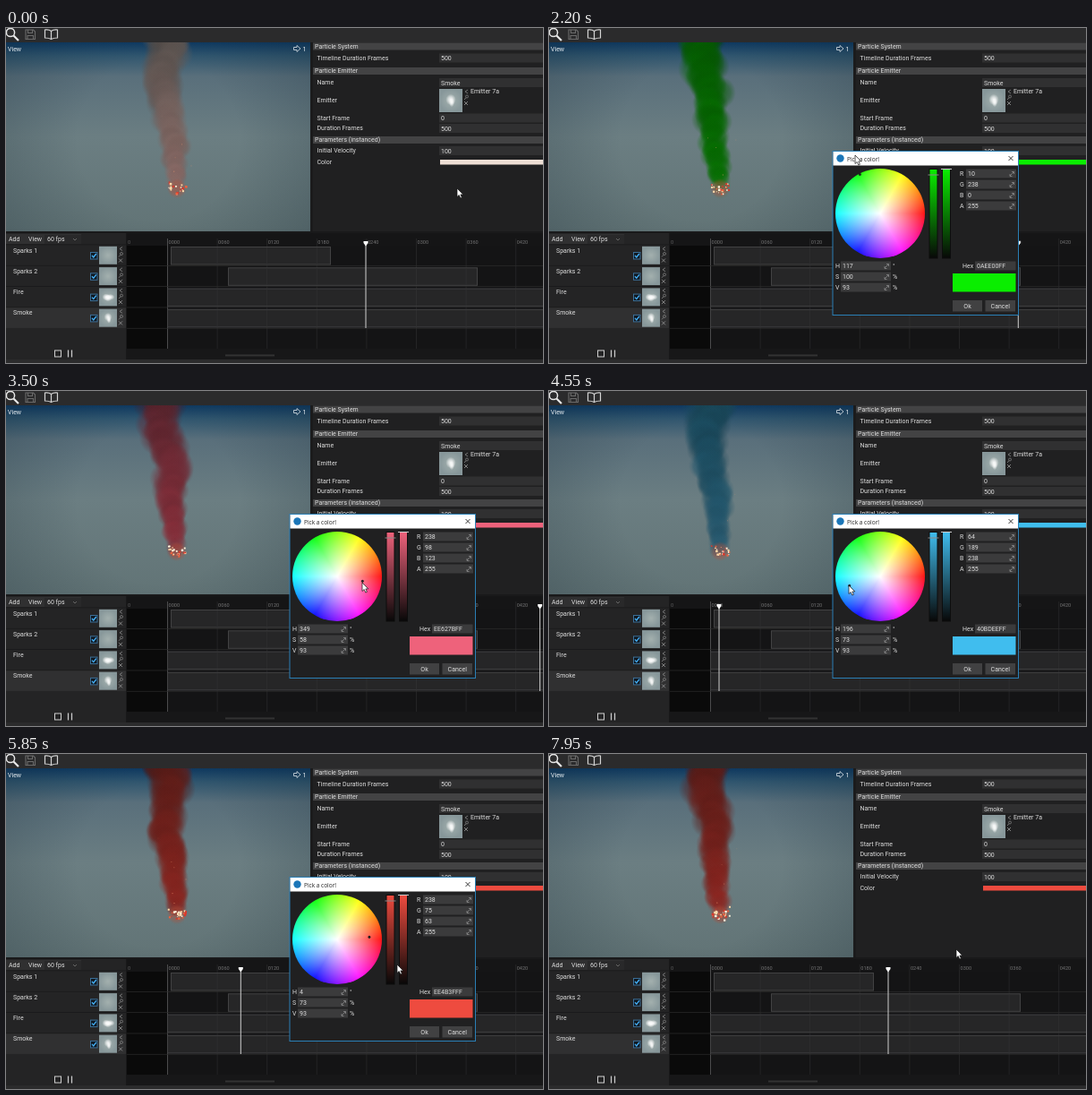
An HTML page with a canvas for the animation above (8 s loop, 600x374 px).

```html
<!DOCTYPE html>
<html lang="en">
<head>
<meta charset="utf-8">
<title>Particle editor</title>
<style>
html, body { margin: 0; width: 100%; height: 100%; overflow: hidden; background: #1b1b1c; }
body { position: relative; }
canvas, svg, #dialog, #wheel { position: absolute; left: 0; top: 0; }
canvas { top: 16px; }
text { font-family: Roboto, "Liberation Sans", sans-serif; font-size: 7px; dominant-baseline: central; white-space: pre; }
#wheel {
  left: 320px; top: 157px; width: 100px; height: 100px; border-radius: 50%;
  background: radial-gradient(closest-side, #fff, rgba(255,255,255,.08)),
    conic-gradient(from 90deg, #f00, #f0f, #00f, #0ff, #0f0, #ff0, #f00);
}
</style>
</head>
<body>
<canvas id="view" width="340" height="211"></canvas>
<svg id="ui" width="600" height="374"></svg>
<div id="dialog"><svg id="picker" width="600" height="374"></svg><div id="wheel"></div></div>
<svg id="top" width="600" height="374"></svg>
<script>
const LOOP = 8000;
const $ = id => document.getElementById(id);
const ui = $('ui'), picker = $('picker'), overlay = $('top');

// ---------- SVG helpers ----------
function add(parent, tag, attrs, content) {
  const e = document.createElementNS('http://www.w3.org/2000/svg', tag);
  for (const k in attrs) e.setAttribute(k, attrs[k]);
  if (content !== undefined) e.textContent = content;
  return parent.appendChild(e);
}
const box = (p, x, y, w, h, fill, stroke) =>
  add(p, 'rect', { x, y, width: w, height: h, fill, stroke: stroke || 'none' });
const label = (p, x, y, s, fill = '#dedede', size = 7) =>
  add(p, 'text', { x, y, fill, style: `font-size:${size}px` }, s);
const line = (p, d, stroke, width = 1, fill = 'none') =>
  add(p, 'path', { d, stroke, 'stroke-width': width, fill });

function gradient(id, vertical, stops) {
  const g = add(add(ui, 'defs', {}), vertical ? 'linearGradient' : 'radialGradient',
    vertical ? { id, x1: 0, y1: 0, x2: 0, y2: 1 } : { id });
  return stops.map(([offset, c, o = 1]) =>
    add(g, 'stop', { offset, 'stop-color': c, 'stop-opacity': o }));
}

// ---------- static interface ----------
gradient('thumb', false, [[0, '#a3b0ae'], [1, '#87979a']]);
gradient('puff', false, [[0, '#fff', .9], [0.45, '#fff', 0.6], [1, '#fff', 0]]);
const tintStop = gradient('shade', true, [[0, '#fff'], [1, '#080808']])[0];

function thumb(x, y, size, kind) {
  box(ui, x, y, size, size, 'url(#thumb)');
  const c = size / 2;
  const puff = (dx, dy, rx, ry) =>
    add(ui, 'ellipse', { cx: x + c + dx, cy: y + c + dy, rx, ry, fill: 'url(#puff)' });
  if (kind === 'fire') { puff(-2, 0, 4.5, 4); puff(2.5, 0, 5, 3.5); puff(0, 1, 4, 4); }
  if (kind === 'smoke') { puff(0, -1, size * .22, size * .24); puff(1, 2, size * .12, size * .2); }
}
function thumbIcons(x, y) {
  line(ui, `M${x + 2} ${y - 2}l-3 2 3 2`, '#888', .8);
  line(ui, `M${x - 2} ${y + 9}l2-2.2`, '#888', .8);
  add(ui, 'circle', { cx: x + 1, cy: y + 5.5, r: 1.5, fill: 'none', stroke: '#888', 'stroke-width': .7 });
  line(ui, `M${x - 2} ${y + 11}l4 4m0-4l-4 4`, '#999', .8);
}

function toolbar() {
  box(ui, 0, 0, 600, 16, '#2b2b2c');
  add(ui, 'circle', { cx: 5, cy: 5, r: 4.6, fill: 'none', stroke: '#e8e8e8', 'stroke-width': 1.5 });
  line(ui, 'M8.5 8.5L14 14', '#e8e8e8', 2.2);
  line(ui, 'M22 2H30.5L32.500 4V12.500H22ZM24.500 2V5.500H29.500V2M24 12.500V8.500H30.500V12.500', '#6a6a6a', 1.1);
  line(ui, 'M50.500 3.500C48 1.500 46 2 43.500 2V11C46 11 48 11 50.500 12.500C53 11 55 11 57.500 11V2C55 2 53 1.500 50.500 3.500V12.500', '#d5d5d5', 1.2);
}

function viewLabels() {
  label(ui, 2, 23.5, 'View', '#e8eef2');
  line(ui, 'M321.500 21.500H325V19.500L329 23 325 26.500V24.500H321.500Z', '#d8e0e6', .8);
  label(ui, 331.5, 23.5, '1', '#e8eef2');
}

function properties() {
  box(ui, 340, 16, 260, 213, '#1b1b1c');
  box(ui, 343, 16, 257, 211, '#202021');
  for (const [y, s] of [[20.5, 'Particle System'], [48, 'Particle Emitter'], [125, 'Parameters (instanced)']]) {
    box(ui, 343, y - 4, 257, 8, '#434344');
    label(ui, 345, y, s);
  }
  const rows = [[33.5, 'Timeline Duration Frames', '500'], [61, 'Name', 'Smoke'], [81, 'Emitter'],
    [100.5, 'Start Frame', '0'], [112, 'Duration Frames', '500'],
    [137, 'Initial Velocity', '100'], [150, 'Color']];
  for (const [y, name, value] of rows) {
    label(ui, 347.5, y, name);
    if (!value) continue;
    box(ui, 484, y - 5, 116, 10, '#303031');
    label(ui, 486, y + .5, value);
  }
  thumb(484, 68, 26, 'smoke');
  thumbIcons(514, 71);
  label(ui, 519, 71, 'Emitter 7a');
}

function timeline() {
  box(ui, 0, 227, 600, 147, '#19191a');
  box(ui, 0, 229, 134, 141, '#242425');
  box(ui, 0, 230, 84, 11, '#303031');
  label(ui, 3, 236, 'Add');
  label(ui, 25, 236, 'View');
  box(ui, 43, 231, 41, 10, '#29292a');
  label(ui, 46, 236, '60 fps');
  line(ui, 'M75 235l2 2 2-2', '#777', .8);

  box(ui, 135, 229, 465, 141, '#0a0a0a');
  box(ui, 180, 243, 420, 115, '#141415');
  box(ui, 135, 229, 465, 14, '#151516');
  box(ui, 135, 358, 465, 12, '#171718');
  box(ui, 245, 364.5, 55, 2, '#333');
  for (let i = 0; i < 8; i++) {
    const x = 180.5 + i * 55.6;
    line(ui, `M${x} 235V358`, i ? '#242425' : '#4c4c4d');
    label(ui, x + 1, 239, String(i * 60).padStart(4, '0'), '#737374', 5.6);
  }
  label(ui, 136, 239, '0', '#606061', 5.6);

  const tracks = [['Sparks 1', '', 184, 362], ['Sparks 2', '', 248, 526],
    ['Fire', 'fire', 180, 643], ['Smoke', 'smoke', 180, 643]];
  tracks.forEach(([name, kind, from, to], i) => {
    const y = 243 + i * 23.3;
    if (i === 3) box(ui, 0, y - 1, 134, 23, '#303031');
    box(ui, 0, y - 1.5, 134, .8, '#19191a');
    box(ui, 135, y + 22, 465, .7, '#2b2b2c');
    label(ui, 8, y + 5.5, name);
    box(ui, 94.5, y + 7.5, 7.5, 7.5, '#101820', '#3b6f98');
    line(ui, `M96 ${y + 11}l1.8 2 3-4`, '#45b4ff', 1.3);
    thumb(104, y + .8, 20, kind);
    thumbIcons(128, y + 3.5);
    box(ui, from + .5, y + 1.5, to - from, 19.5, '#262627', '#424243');
    for (let x = 236.1; x < to && x < 600; x += 55.6)
      if (x > from) line(ui, `M${x} ${y + 2}v18.5`, '#2e2e2f');
  });
  box(ui, 54.5, 360, 7, 7, 'none', '#d0d0d0');
  line(ui, 'M69.5 359.5V367.5M73.5 359.5V367.5', '#d0d0d0', 1.2);
  box(ui, 0, 370, 600, 4, '#2b2b2c');
}

toolbar();
viewLabels();
properties();
timeline();
const colorBar = box(ui, 485, 147, 115, 5.5, '#fff');
const playhead = add(ui, 'g', {});
line(playhead, 'M0 240V335', '#cfcfcf', 1);
add(playhead, 'path', { d: 'M-2.5 238H2.5V240L0 243.5-2.5 240Z', fill: '#fff' });

// ---------- color dialog ----------
box(picker, 317, 137.5, 207.5, 183, '#202021', '#2a7fb5');
box(picker, 317.5, 138, 206.5, 15.5, '#fff');
add(picker, 'circle', { cx: 325.5, cy: 145.5, r: 4.2, fill: '#1b76b8' });
label(picker, 333, 146, 'Pick a color!', '#222', 6.5).style.fontFamily = '"Open Sans", sans-serif';
line(picker, 'M513.5 143l5 5m0-5l-5 5', '#222', .9);

const values = {};
function field(key, name, nameX, x, y, w, icon, suffix) {
  label(picker, nameX, y, name);
  box(picker, x, y - 5, w, 10, '#3b3b3c');
  values[key] = label(picker, x + 2, y + .3, '');
  if (icon) line(picker, `M${x + w - 7} ${y + 2.5}l4.5-4.5m-2.5 0h2.5v2.5m-4.5 0v2.5h2.5`, '#8b8b8c', .8);
  if (suffix) label(picker, x + w + 2, y, suffix);
}
['R', 'G', 'B', 'A'].forEach((k, i) => field(k, k, 459, 466, 162.5 + i * 12, 56, true));
['H', 'S', 'V'].forEach((k, i) => field(k, k, 320, 326, 265.5 + i * 12, 56, true, i ? '%' : '°'));
field('hex', 'Hex', 462, 476, 265.5, 45.5, false);
const swatch = box(picker, 451, 274, 70.5, 20.5, '#fff');
for (const [x, w, s] of [[451, 33, 'Ok'], [487.5, 33.5, 'Cancel']]) {
  box(picker, x, 304, w, 12.5, '#414142');
  label(picker, x + w / 2, 310.5, s).setAttribute('text-anchor', 'middle');
}
box(picker, 425, 157.5, 9, 99.5, 'url(#shade)', '#0d0d0d');
box(picker, 439.5, 157.5, 9, 99.5, 'url(#shade)', '#0d0d0d');
line(picker, 'M423.5 164H435.5', '#888', 1);
line(picker, 'M438 157.5H450', '#ccc', 1);

const dot = add(overlay, 'circle', { r: 1.3, fill: '#222', stroke: '#0008', 'stroke-width': .5 });
const cursor = add(overlay, 'path', {
  d: 'M0 0V9.5L2.2 7.5 3.8 11 5.4 10.3 3.9 6.9H6.8Z',
  fill: '#fff', stroke: '#111', 'stroke-width': .7 });

// ---------- motion ----------
const pointerKeys = [[0, 504, 179], [250, 504, 179], [600, 508, 150], [750, 508, 150],
  [1250, 378, 205], [1400, 377, 205], [1900, 345, 160], [2200, 342, 142], [2400, 342, 142],
  [2900, 392, 178], [3500, 398, 214], [4000, 371, 243], [4550, 335, 217], [4800, 335, 217],
  [5400, 406, 204], [5550, 406, 204], [5850, 437, 235], [6450, 467, 310], [6700, 467, 310],
  [7500, 455, 218], [8000, 455, 218]];
// time, hue, saturation; mixed as points on the wheel
const hueKeys = [[0, 23.08, .10924], [1400, 23.08, .10924], [1900, 122, 1], [2200, 117.479, 1],
  [2400, 117.479, 1], [2900, 52, .74], [3500, 349.286, .58824], [4000, 272, .74],
  [4550, 196.897, .73109], [4800, 196.897, .73109], [5400, 4.114, .73529], [8000, 4.114, .73529]]
  .map(([t, h, s]) => [t, Math.cos(h * Math.PI / 180) * s, Math.sin(h * Math.PI / 180) * s]);

function at(keys, t) {
  let i = 1;
  while (i < keys.length - 1 && keys[i][0] < t) i++;
  const a = keys[i - 1], b = keys[i];
  const u = (t - a[0]) / (b[0] - a[0]), e = u * u * (3 - 2 * u);
  return [a[1] + (b[1] - a[1]) * e, a[2] + (b[2] - a[2]) * e];
}

function toRgb(h, s, max) {
  return [5, 3, 1].map(n => {
    const k = (n + h / 60) % 6;
    return Math.round(max * (1 - s * Math.max(0, Math.min(k, 4 - k, 1))));
  });
}

// ---------- viewport ----------
const ctx = $('view').getContext('2d');
ctx.translate(0, -16);
const rnd = n => { const v = Math.sin(n * 127.1 + 3.7) * 43758.5453; return v - Math.floor(v); };

const sky = ctx.createLinearGradient(0, 16, 0, 227);
[[0, '#0f3a62'], [.07, '#30566f'], [.18, '#596f7b'], [.5, '#6b7e82'], [1, '#627476']]
  .forEach(([o, c]) => sky.addColorStop(o, c));
const vignette = ctx.createRadialGradient(170, 125, 90, 170, 125, 215);
vignette.addColorStop(0, 'rgba(10,28,40,0)');
vignette.addColorStop(1, 'rgba(10,28,40,.24)');

function blob(x, y, r, rgb, alpha) {
  const c = rgb.map(Math.round).join();
  const g = ctx.createRadialGradient(x, y, 0, x, y, r);
  g.addColorStop(0, `rgba(${c},${alpha})`);
  g.addColorStop(.65, `rgba(${c},${alpha * .85})`);
  g.addColorStop(1, `rgba(${c},0)`);
  ctx.fillStyle = g;
  ctx.fillRect(x - r, y - r, 2 * r, 2 * r);
}

function smoke(sec, rgb) {
  const step = .04, life = 2.6;
  for (let n = Math.ceil((sec - life) / step); n <= sec / step; n++) {
    const k = Math.max(0, (sec - n * step) / life);
    const x = 191 - 18 * k + Math.sin(n * .17) * 7 * k + (rnd(n) - .5) * (5 + 18 * k);
    const y = 181 - 182 * k + (rnd(n + 500) - .5) * 8;
    const dim = .58 - .24 * k + (rnd(n + 900) - .5) * .1;
    const warm = 1 - .2 * (1 - k);
    blob(x, y, 8 + 14 * Math.sqrt(k) * (.6 + .6 * rnd(n + 300)),
      [rgb[0] * dim, rgb[1] * dim * warm, rgb[2] * dim * warm], .48 * Math.min(1, k * 9));
  }
}

function fire(sec) {
  const beat = Math.floor(sec * 20);
  blob(191, 179, 11, [190, 75, 50], .4);
  for (let i = 0; i < 26; i++) {
    const slot = Math.floor(beat / 3 + rnd(i)) * 31 + i;
    const x = 191 + (rnd(slot) - .5) * 21;
    const y = 185 - rnd(slot + 7) * 9 - Math.abs(x - 191) * rnd(slot + 3) * .8;
    const size = .8 + rnd(slot + 11) * 1.8;
    ctx.fillStyle = ['#fff4dc', '#ffd9a8', '#f0603c', '#d8392c'][i % 4];
    ctx.fillRect(x, y, size, size);
  }
}

function sparks(sec, frame) {
  const count = (frame > 4 && frame < 196 ? 3 : 0) + (frame > 73 && frame < 373 ? 5 : 0);
  for (let i = 0; i < count; i++) {
    const p = sec / 1.1 + rnd(i + 40), n = Math.floor(p) * 13 + i, k = p % 1;
    ctx.fillStyle = `rgba(255,165,120,${.8 * (1 - k)})`;
    ctx.fillRect(191 + (rnd(n) - .5) * 55 * k, 176 - 70 * k * (.5 + rnd(n + 5)), 1, 1);
  }
}

// ---------- frame ----------
function render(t) {
  const [dx, dy] = at(hueKeys, t);
  const sat = Math.min(1, Math.hypot(dx, dy));
  const hue = (Math.atan2(dy, dx) * 180 / Math.PI + 360) % 360;
  const rgb = toRgb(hue, sat, 238), css = `rgb(${rgb})`;
  const open = t >= 700 && t < 6650;

  ctx.fillStyle = sky;
  ctx.fillRect(0, 16, 340, 211);
  ctx.fillStyle = vignette;
  ctx.fillRect(0, 16, 340, 211);
  const wrapped = t >= 4370;
  const x = wrapped ? 180 + (t - 4370) * .0556 : 402 + t * .0556;
  const sec = t / 1000 + 10;
  smoke(sec, rgb);
  fire(sec);
  sparks(sec, (x - 180) / .9267);

  playhead.setAttribute('transform', `translate(${x.toFixed(1)})`);
  colorBar.setAttribute('fill', css);
  swatch.setAttribute('fill', css);
  tintStop.setAttribute('stop-color', css);

  const shown = { R: rgb[0], G: rgb[1], B: rgb[2], A: 255,
    H: Math.floor(hue), S: Math.floor(sat * 100 + 1e-6), V: 93,
    hex: [...rgb, 255].map(v => v.toString(16).padStart(2, '0')).join('').toUpperCase() };
  for (const k in shown) values[k].textContent = shown[k];

  $('dialog').style.display = dot.style.display = open ? '' : 'none';
  dot.setAttribute('cx', 370 + dx * 49);
  dot.setAttribute('cy', 207 - dy * 49);
  const [px, py] = at(pointerKeys, t);
  cursor.setAttribute('transform', `translate(${px.toFixed(1)} ${py.toFixed(1)})`);
}

const start = performance.now();
function tick() {
  const t = (performance.now() - start) % LOOP;
  render(Math.floor(t / 50) * 50);
  requestAnimationFrame(tick);
}
tick();
</script>
</body>
</html>
```
